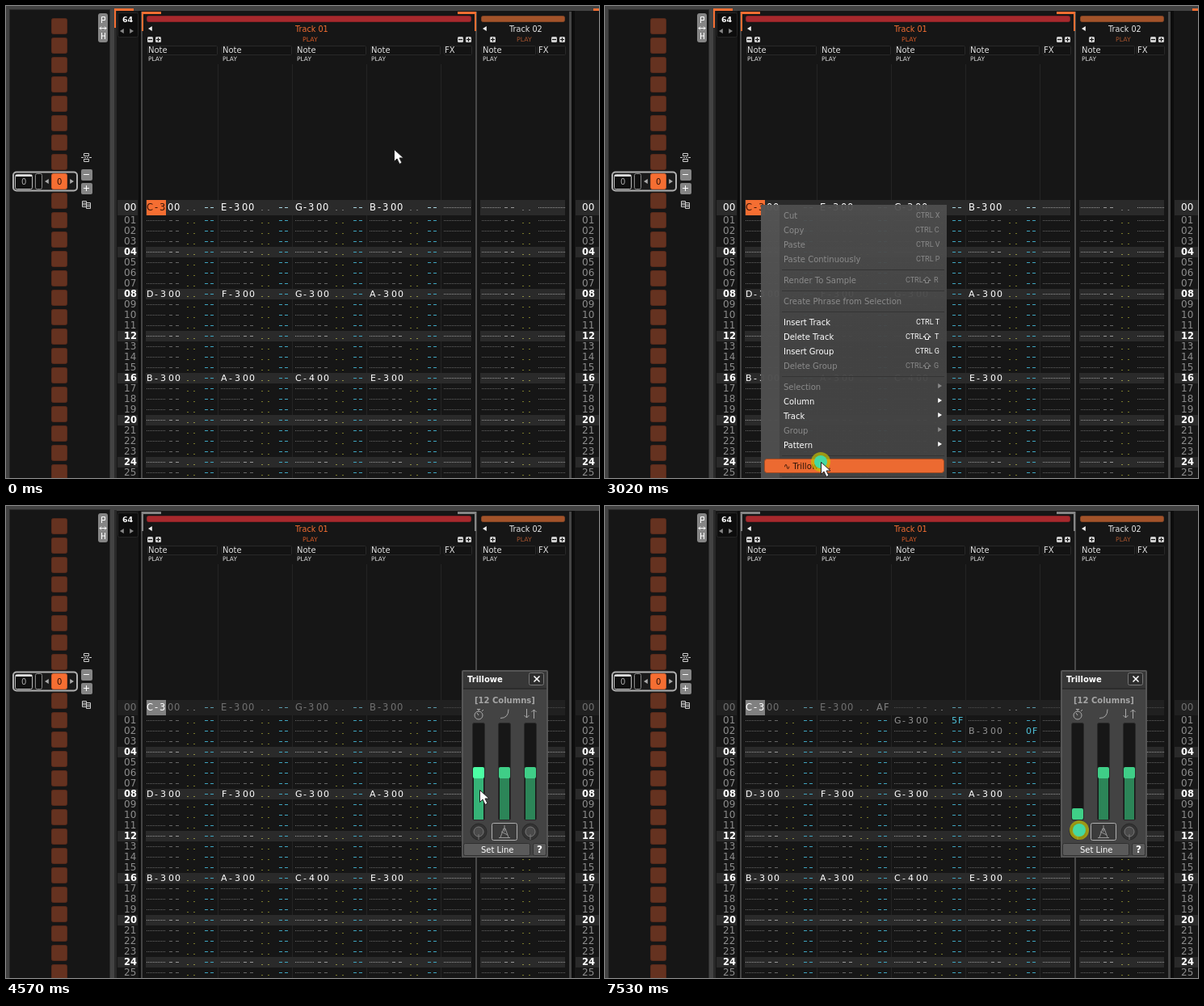
Recreate the animation shown at these times as an HTML page with a canvas. Size 734 px wide and 584 px high, loop 8000 ms.

```html
<!DOCTYPE html>
<html>
<head>
<meta charset="utf-8">
<style>
html, body { margin: 0; width: 734px; height: 584px; overflow: hidden; background: #161616; }
canvas { display: block; }
</style>
</head>
<body>
<canvas id="stage" width="734" height="584"></canvas>
<script>
const ctx = document.getElementById('stage').getContext('2d');
const LOOP = 8000;
const TOOL = 'Trillowe';
const SANS = '"DejaVu Sans", sans-serif';
const ORANGE = '#f56e32';
const COLUMNS = [174, 266, 358, 450];

// Pointer moves: first step, last step, step count, target x, target y, bend
const MOVES = [
  [50, 690, 9, 194, 246], [860, 860, 1, 192, 246], [1030, 1030, 1, 192, 245],
  [1470, 1620, 3, 257, 343], [1770, 2550, 11, 267, 562], [2650, 2650, 1, 267, 564],
  [3410, 3790, 6, 466, 259, 1.5], [4020, 4260, 4, 593, 209], [4410, 4570, 3, 586, 351],
  [4720, 4890, 3, 586, 330], [5040, 5040, 1, 585, 330], [5117, 5810, 10, 585, 351],
  [5890, 6430, 8, 585, 381], [6650, 6650, 1, 585, 377], [6890, 7380, 7, 586, 401],
  [7530, 7530, 1, 587, 401]
];
const PRESSES = [[1030, 1170], [3020, 3260], [3940, 4340], [5040, 6650], [7530, LOOP]];

// Menu items: label, centre y, enabled, shortcut key or '>' for a submenu, with shift
const MENU = [
  ['Cut', 259, 0, 'X'], ['Copy', 277, 0, 'C'], ['Paste', 295, 0, 'V'],
  ['Paste Continuously', 313, 0, 'P'], ['Render To Sample', 339, 0, 'R', 1],
  ['Create Phrase from Selection', 365, 0], ['Insert Track', 391, 1, 'T'],
  ['Delete Track', 409, 1, 'T', 1], ['Insert Group', 427, 1, 'G'],
  ['Delete Group', 445, 0, 'G', 1], ['Selection', 471, 0, '>'], ['Column', 489, 1, '>'],
  ['Track', 507, 1, '>'], ['Group', 525, 0, '>'], ['Pattern', 543, 1, '>'],
  ['∿ ' + TOOL + '...', 569, 1]
];

const smooth = p => p * p * (3 - 2 * p);
const rowY = n => n ? 252 + 13 * n : 249;

function rect(x, y, w, h, color) {
  ctx.fillStyle = color;
  ctx.fillRect(x, y, w, h);
}

function box(x, y, w, h, r, fill, stroke, line = 1) {
  ctx.beginPath();
  ctx.roundRect(x, y, w, h, r);
  if (fill) { ctx.fillStyle = fill; ctx.fill(); }
  if (stroke) { ctx.strokeStyle = stroke; ctx.lineWidth = line; ctx.stroke(); }
}

// Capitals are centred on y; both axes snap to whole pixels
function text(s, x, y, color, size = 10, align = 'left', weight = '', family = SANS) {
  ctx.font = `${weight} ${size}px ${family}`;
  ctx.fillStyle = color;
  const shift = { left: 0, center: .5, right: 1 }[align];
  ctx.fillText(s, Math.round(x - shift * ctx.measureText(s).width), Math.round(y + .365 * size + .1));
}

function path(d, stroke, fill, line = 1) {
  const p = new Path2D(d);
  if (fill) { ctx.fillStyle = fill; ctx.fill(p); }
  if (stroke) { ctx.strokeStyle = stroke; ctx.lineWidth = line; ctx.stroke(p); }
}

function circle(x, y, r, fill, stroke, line = 1) {
  box(x - r, y - r, 2 * r, 2 * r, r, fill, stroke, line);
}

// Triangle pointing left (dir -1) or right (dir 1)
function arrow(x, y, dir, color, size = 3) {
  path(`M${x + dir * size} ${y}l${-dir * size * 1.6} ${-size}v${2 * size}z`, null, color);
}

function dots(x, y, w, color) {
  for (let i = 0; i < w; i += 2) rect(x + i, y, 1, 1, color);
}

function pointer(t) {
  let x = 480, y = 177;
  for (const [start, end, count, toX, toY, bend = 1] of MOVES) {
    if (t < start) break;
    const step = count > 1 ? Math.floor((t - start) / (end - start) * (count - 1) + 1e-6) + 1 : 1;
    const p = smooth(Math.min(1, step / count));
    x += (toX - x) * (1 - (1 - p) ** bend);
    y += (toY - y) * p;
  }
  return { x: Math.round(x), y: Math.round(y) };
}

function drawSequencer() {
  rect(0, 0, 734, 584, '#434343');
  rect(4, 4, 125, 580, '#2b2b2b');
  rect(5, 5, 123, 579, '#161616');
  for (let y = 25; y < 590; y += 24) {
    if (y !== 217) box(56.5, y - 9.5, 19, 19, 2, '#653220', '#57291a');
  }
  box(9, 205.5, 79, 23, 4, '#1a1a1a', '#b0b0b0', 2);
  box(11.5, 208.5, 21, 18, 2, '#101010', '#bbb');
  rect(12, 209, 20, 2, '#ddd');
  text('0', 22, 217, '#aaa', 10, 'center');
  box(36.5, 207.5, 8, 19, 2, '#101010', '#888');
  arrow(51, 217, -1, '#aaa');
  arrow(81, 217, 1, '#aaa');
  box(56.5, 207.5, 19, 19, 2, ORANGE, '#c9592a');
  text('0', 66, 217, '#2a1008', 10, 'center');

  for (const [y, vertical] of [[209, 0], [226, 6]]) {
    box(93, y - 7, 14, 14, 2, '#858585');
    rect(96, y - 1, 7, 1, '#fff');
    if (vertical) rect(99, y - 4, 1, 7, '#fff');
  }
  path('M96.5 185.5v-3h6v3zM96.5 189.5v3h6v-3zM93 187.5h3m1 0h2m1 0h2m1 0h3', '#ccc');
  path('M94.500 241.500h5v7h-5zM99.500 243.500h5v7h-5zM95 244h4m-4 2h4m1 0h4m-4 2h4', '#ccc');
  box(114, 9, 12, 36, 3, '#858585');
  path('M118.500 21v-7.500h4v4h-4M116 27.500h8m-6-2l-2 2 2 2m4-4l2 2-2 2M118.500 33v8m4-8v8m-4-4h4', '#fff');
}

function smallButton(x, plus) {
  box(x, 38, 7, 7, 1.5, '#d0d0d0');
  rect(x + 1, 41, 5, 1, '#111');
  if (plus) rect(x + 3, 39, 1, 5, '#111');
}

function bracket(left, right, y, color) {
  rect(left, y, 24, 3, color);
  rect(left, y, 2, 24, color);
  if (right) {
    rect(right - 22, y, 23, 3, color);
    rect(right - 1, y, 2, 24, color);
  }
}

function field(label, x, w) {
  box(x + .5, 49.5, w, 11, 1, '#131313', '#292929');
  text(label, x + 1, 54, '#e0e0e0');
}

function drawHeader(focused) {
  rect(137, 6, 597, 578, '#161616');
  rect(134, 5, 3, 579, '#2a2a2a');
  if (focused) {
    bracket(134, 0, 3, ORANGE);
    rect(727, 3, 7, 3, ORANGE);
  }
  box(138.5, 8.5, 25, 30, 2, '#0d0d0d', '#252525');
  text('64', 151, 16, '#fff', 9.5, 'center', 'bold');
  arrow(144, 31, -1, '#888');
  arrow(155, 31, 1, '#888');
  rect(164, 6, 3, 578, '#0c0c0c');
  rect(167, 7, 2, 577, '#444');
  rect(581, 7, 2, 577, '#484848');
  rect(697, 7, 3, 577, '#444');
  rect(700, 6, 4, 578, '#0c0c0c');
  bracket(168, 581, 7, focused ? ORANGE : '#858585');

  box(174.5, 12.5, 401, 7, 2, '#a8292d', '#852226');
  box(588.5, 12.5, 103, 7, 2, '#a3532a', '#804323');
  text('Track 01', 378, 28, ORANGE, 9.7, 'center');
  text('Track 02', 643, 28, '#e8e8e8', 9.7, 'center');
  arrow(179, 28, -1, '#eee');
  arrow(593, 28, -1, '#eee');
  text('PLAY', 376, 41, '#d85c28', 7.8, 'center');
  text('PLAY', 641, 41, '#a8552e', 7.8, 'center');
  for (const [x, plus] of [[175], [185, 1], [559], [569, 1], [599, 1], [675], [685, 1]]) smallButton(x, plus);
  for (const x of COLUMNS) {
    field('Note', x + 1, 86);
    text('PLAY', x + 2, 65, '#ddd', 7.5);
    rect(x + 88, 72, 1, 512, '#242424');
  }
  field('FX', 542, 34);
  field('Note', 589, 66);
  field('FX', 658, 34);
  text('PLAY', 590, 65, '#ddd', 7.5);
}

// Notes sit at line -> column; the drag spreads the first chord over later lines
function noteGrid(spread) {
  const grid = {};
  const put = (line, col, note, delay) => { grid[line + ':' + col] = { note, delay }; };
  ['C-3', 'E-3', 'G-3', 'B-3'].forEach((note, col) => {
    const ticks = Math.floor(spread * col / 3);
    const hex = (ticks % 256).toString(16).toUpperCase().padStart(2, '0');
    put(ticks >> 8, col, note, ticks ? hex : '');
  });
  ['D-3', 'F-3', 'G-3', 'A-3'].forEach((note, col) => put(8, col, note));
  ['B-3', 'A-3', 'C-4', 'E-3'].forEach((note, col) => put(16, col, note));
  return grid;
}

function letters(s, x, y, color, size) {
  [...s].forEach((ch, i) => text(ch, x + 4 + 8 * i, y, color, size, 'center'));
}

function drawCell(x, y, cell, style) {
  const { ink, dim, delayInk, size } = style;
  if (cell) {
    letters(cell.note, x, y, ink, size);
    letters('00', x + 26, y, ink, size);
  } else {
    dots(x, y, 24, dim);
    rect(x + 28, y, 4, 1, dim);
    rect(x + 36, y, 4, 1, dim);
  }
  for (const dx of [50, 58]) rect(x + dx, y + 3, 2, 1, style.volume);
  if (!delayInk) return;
  if (cell && cell.delay) letters(cell.delay, x + 70, y, style.valueInk, size);
  else for (const dx of [72, 79]) rect(x + dx, y, 4, 1, delayInk);
}

function drawPattern(focused, spread) {
  const grid = noteGrid(spread);
  for (let n = 0; n < 26; n++) {
    const y = rowY(n), beat = n % 4 === 0, first = n === 0;
    if (beat) {
      const h = first ? 19 : 13, top = first ? 240 : y - 6;
      const shade = first && !focused ? '#202020' : '#2a2a2a';
      for (const [x, w] of [[138, 25], [173, 403], [587, 105], [705, 29]]) rect(x, top, w, h, shade);
    }
    const faded = first && !focused;
    const numberInk = faded ? '#707070' : beat ? '#fff' : '#8c8c8c';
    const label = String(n).padStart(2, '0');
    const weight = beat && !first ? 'bold' : '';
    for (const x of [154, 721]) text(label, x, y, numberInk, weight ? 11.5 : 12, 'center', weight);

    const style = {
      ink: faded ? '#707070' : beat ? '#fff' : '#929292',
      dim: faded ? '#505050' : beat ? '#989898' : '#666',
      volume: first ? '#707070' : beat ? '#8d8d45' : '#77772a',
      delayInk: first ? (focused ? '#a9d5e0' : '#5b9aab') : '#3fa5c0',
      valueInk: first ? '#808080' : '#4fc4dc',
      size: first ? 11.5 : 11
    };
    COLUMNS.forEach((x, col) => drawCell(x, y, grid[n + ':' + col], style));
    if (first) {
      rect(174, 240, 24, 19, focused ? ORANGE : '#808080');
      letters('C-3', 174, y, focused ? '#3a1508' : '#fff', 11.5);
    }
    dots(542, y, 34, style.dim);
    drawCell(589, y, null, { ...style, delayInk: null });
    dots(659, y, 33, style.dim);
  }
}

function drawMenu(p) {
  const shade = ctx.createLinearGradient(0, 246, 0, 420);
  shade.addColorStop(0, 'rgba(78,78,78,.95)');
  shade.addColorStop(1, 'rgba(68,68,68,.96)');
  rect(193, 246, 230, 340, shade);
  rect(193, 246, 23, 340, 'rgba(92,92,92,.4)');
  for (const y of [326, 352, 378, 458, 556, 582]) rect(219, y, 201, 1, '#343434');
  for (const [label, y, enabled, key, shift] of MENU) {
    const hot = enabled && p.x > 194 && Math.abs(p.y - y) < 9;
    if (hot) box(197.5, y - 8.5, 222, 17, 3, '#ec6a31', '#a34a22');
    const ink = hot ? '#2b1208' : enabled ? '#fff' : '#8b8b8b';
    const keyText = (s, x) => text(s, x, y, ink, 9, 'right', '', 'Roboto, sans-serif');
    text(label, 221, y, ink);
    if (key === '>') arrow(414, y - 1, 1, ink);
    else if (shift) {
      keyText('CTRL', 393);
      path(`M398.500 ${y - 4}l4.500 4.500h-2.500v3h-4v-3h-2.500z`, ink);
      keyText(key, 413);
    } else if (key) keyText('CTRL ' + key, 414);
  }
}

function slider(x, center, bright) {
  box(x - 7.5, 65.5, 15, 120, 2, '#171717', '#2a2a2a');
  rect(x - 6, center, 12, 185 - center, bright ? '#36b377' : '#2c8558');
  box(x - 7, center - 7, 14, 14, 2, bright ? '#4cffa4' : '#3fce87');
}

function knob(x) {
  circle(x, 200, 10, '#333', '#2a2a2a');
  circle(x, 200, 6, '#4a4a4a', '#777');
  rect(x - .5, 203, 1, 7, '#777');
}

function drawDialog(dx, drag, bright) {
  ctx.save();
  ctx.translate(437 + dx, 253 - Math.round(dx * 50 / 127));
  box(0, 0, 107, 232, 2, '#555');
  rect(2, 2, 103, 20, '#373737');
  rect(2, 24, 103, 206, '#434343');
  rect(2, 22, 103, 2, '#2c2c2c');
  text(TOOL, 7, 11, '#fff', 10, 'left', 'bold');
  box(83.5, 3.5, 18, 15, 2, '#2d2d2d', '#777');
  path('M89.500 7.500l7 7m0-7l-7 7', '#fff', null, 1.5);
  text('[12 Columns]', 53.5, 37, '#a5a5a5', 10, 'center', 'bold');

  circle(21, 56, 5, null, '#aaa');
  path('M21 56l-2-3M19 48.500h4M21 49v2M25 51l2-2', '#aaa');
  path('M48 59.500q10 0 10-11', '#aaa');
  path('M80.500 48v11m-3-3l3 3 3-3M89.500 60v-11m-3 3l3-3 3 3', '#aaa');

  slider(21, 127 + drag, bright);
  slider(53, 127);
  slider(85, 127);
  knob(21);
  knob(85);
  box(37.5, 189.5, 31, 21, 2, '#3b3b3b', '#b0b0b0');
  path('M46 207.500h14M48 207l4-11h2l4 11M53 192v8M49 200l8 4', '#999');
  box(2.5, 214.5, 82, 15, 2, '#5a5a5a', '#303030');
  text('Set Line', 44, 222, '#fff', 10, 'center');
  box(88.5, 214.5, 16, 15, 2, '#5a5a5a', '#303030');
  text('?', 96, 222, '#fff', 12, 'center', 'bold');
  ctx.restore();
}

function drawPress(x, y, dragging) {
  circle(x, y, 12, 'rgba(200,195,0,.67)');
  if (dragging) box(x - 7, y - 7, 14, 14, 3, '#44fca0');
  else circle(x, y, 8, '#45d9a2');
}

function drawCursor({ x, y }) {
  path(`M${x + .5} ${y + .5}v15l3.500-3.500 3 6.500 3-1.500-3-6h5z`, '#222', '#fff');
}

function draw(t) {
  const p = pointer(t);
  const focused = t < 3100;
  const dragging = t >= 5040 && t < 6650;
  const drag = t < 5040 ? 0 : dragging ? p.y - 330 : 51;
  const dialogX = t < 4020 ? 0 : t < 4410 ? p.x - 466 : 127;
  const hover = t >= 4490 && p.y < 388;

  drawSequencer();
  drawHeader(focused);
  drawPattern(focused, drag * 527 / 51);
  if (t >= 1170 && t < 3100) drawMenu(p);
  if (t >= 3180) drawDialog(dialogX, drag, dragging || hover);
  if (PRESSES.some(([from, to]) => t >= from && t < to)) drawPress(p.x, p.y, dragging);
  if (!dragging && t < 7530) drawCursor(p);
}

const began = performance.now();
function frame() {
  draw((performance.now() - began) % LOOP);
  requestAnimationFrame(frame);
}
frame();
</script>
</body>
</html>
```
